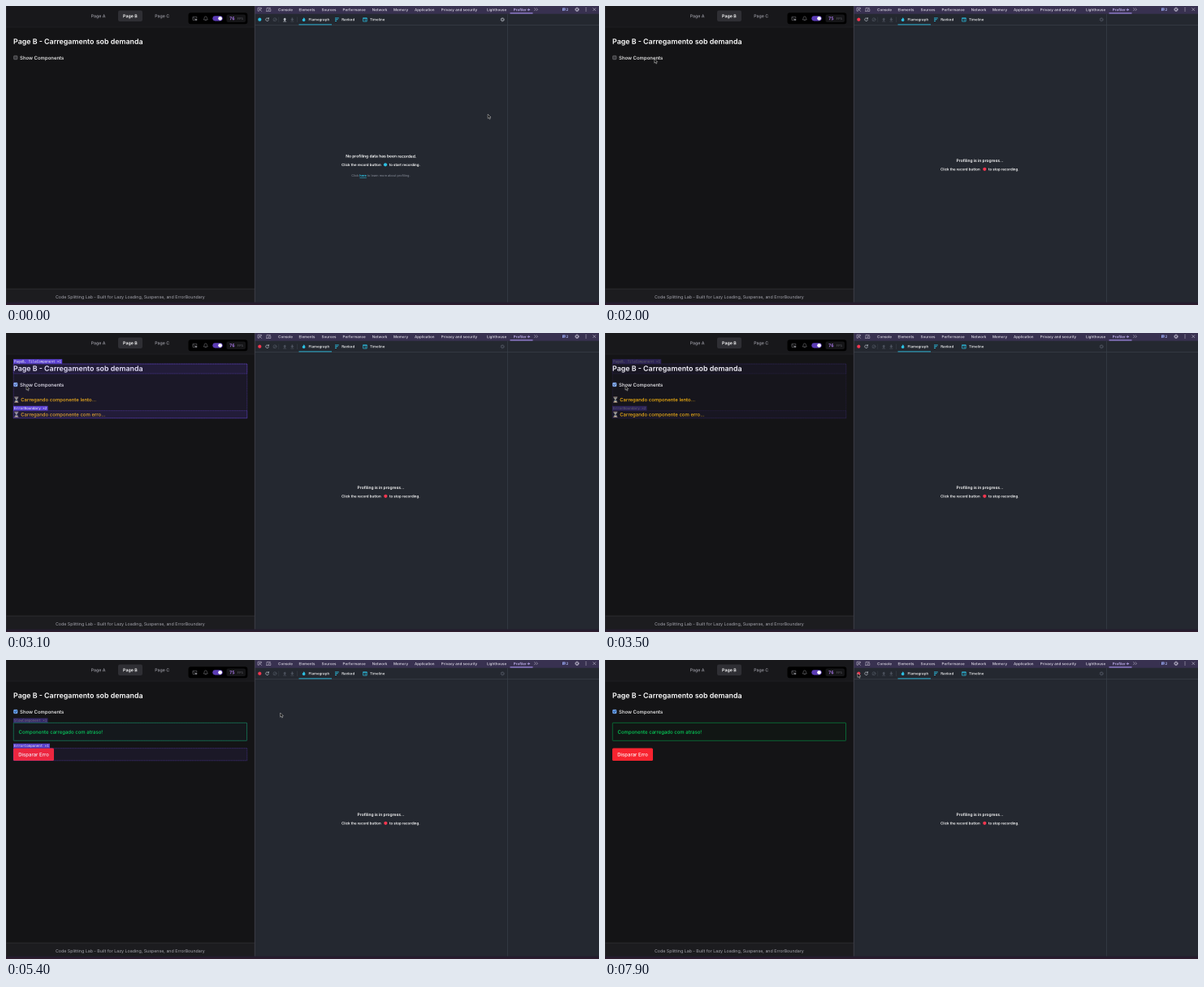
Recreate the animation shown at these times as an HTML page. Size 730 by 368 pixels, loop 8000 ms.

```html
<!DOCTYPE html>
<html lang="pt">
<head>
<meta charset="utf-8">
<title>Page B</title>
<style>
html, body { margin: 0; width: 100%; height: 100%; overflow: hidden; background: #141416; }
svg { display: block; width: 730px; height: 368px; }
/* the tiny tilt lets small glyphs sit between whole pixels */
text { font-family: Inter, "Open Sans", sans-serif; text-rendering: geometricPrecision; white-space: pre;
  transform-box: fill-box; transform-origin: 0 50%; transform: rotate(.03deg); }
.nav { font-size: 5.25px; font-weight: 500; fill: #a1a1aa; text-anchor: middle; }
.body { font-size: 6px; font-weight: 500; }
.tab { font-size: 4.55px; font-weight: 500; fill: #dedbe6; text-anchor: middle; }
.sub { font-size: 4.5px; font-weight: 500; fill: #f2f3f5; }
.big { font-size: 4.95px; font-weight: 600; fill: #fff; text-anchor: middle; }
.mid { font-size: 4.42px; font-weight: 600; fill: #fff; }
.small { font-size: 3.85px; fill: #8b919d; text-anchor: middle; }
.mono { font-family: "DejaVu Sans Mono", monospace; }
.label { font-size: 4.2px; fill: #fff; }
.line { fill: none; stroke-width: .7; stroke-linecap: round; stroke-linejoin: round; }
</style>
</head>
<body>
<svg viewBox="0 0 730 368">
  <defs>
    <path id="arrow" d="M-.8 0H.8V1.8H2.1L0 3.9-2.1 1.8H-.8Z"/>
    <g id="gear"><circle r="1.5" fill="none" stroke-width=".7"/><circle r="2.2" fill="none" stroke-width=".7" stroke-dasharray=".87 .86"/></g>
    <g id="glass">
      <path d="M.8 0H5.2V1.2Q5 2.4 3.4 3.3Q5 4.2 5.2 5.4V6.6H.8V5.4Q1 4.2 2.6 3.3Q1 2.4 .8 1.2Z" fill="#6f7a80"/>
      <path d="M.4 .1H5.6M.4 6.5H5.6" stroke="#a98a74" stroke-width=".7"/>
      <path d="M1.5 6.1Q3 3.8 4.5 6.1ZM1.9 1.6H4.1L3 2.9Z" fill="#e8cf92"/>
    </g>
  </defs>

  <!-- page -->
  <rect width="306" height="368" fill="#141416"/>
  <rect width="306" height="26" fill="#18181b"/>
  <path d="M0 26.2H306" stroke="#232327" stroke-width=".6"/>
  <rect x="138" y="5.5" width="30" height="13.5" rx="2" fill="#2f2f34"/>
  <text class="nav" x="113.6" y="14.2">Page A</text>
  <text class="nav" x="152.9" y="14.2" style="fill:#fff;font-weight:600">Page B</text>
  <text class="nav" x="192.2" y="14.2">Page C</text>

  <rect x="224.5" y="8.3" width="72.8" height="14" rx="3" fill="#000"/>
  <g class="line" stroke="#85858b" style="stroke-width:.5">
    <path d="M230 15V13.3H234.8V14.9M230 15V17.4H231.8M231.2 14.5 232.7 16"/>
    <path d="M233 16.1H235V17.6H233Z" fill="#85858b"/>
    <path d="M243.5 16.6Q244.1 15.8 244.1 14.7Q244.2 12.9 245.8 12.9Q247.4 12.9 247.5 14.7Q247.5 15.8 248.1 16.6ZM245.2 17.7H246.4"/>
  </g>
  <rect x="254.3" y="12.3" width="12.4" height="6.1" rx="3.05" fill="#5b3bb5"/>
  <circle cx="263.6" cy="15.35" r="2.35" fill="#fff"/>
  <rect x="271.5" y="10.6" width="23.5" height="9.4" rx="2" fill="#151517"/>
  <text id="fps" class="mono" x="275" y="17.3" font-size="5.5" font-weight="700" fill="#a374e0"></text>
  <text class="mono" x="284.4" y="16.9" font-size="4.2" fill="#55555c">FPS</text>

  <text x="9" y="46.8" font-size="8.85" font-weight="600" fill="#fff">Page B - Carregamento sob demanda</text>
  <g id="box">
    <rect x="9.6" y="61.3" width="4.4" height="4.4" rx=".7" stroke-width=".6"/>
    <path id="tick" class="line" d="M10.6 63.6 11.5 64.6 13 62.4" stroke="#fff"/>
  </g>
  <text class="body" x="17" y="66" fill="#fafafa">Show Components</text>

  <g id="slowWait" fill="#ffb90a"><use href="#glass" x="9.8" y="78.8"/><text class="body" x="18.2" y="84.2">Carregando componente lento...</text></g>
  <g id="failWait" fill="#ffb90a"><use href="#glass" x="9.8" y="97"/><text class="body" x="18.2" y="102.4">Carregando componente com erro...</text></g>
  <g id="slow">
    <rect x="9.3" y="77.3" width="287.2" height="22" rx=".5" fill="#111614" stroke="#08783c" stroke-width=".8"/>
    <text class="body" x="15.6" y="90.8" fill="#05d65c">Componente carregado com atraso!</text>
  </g>
  <g id="fail">
    <rect x="9" y="108.4" width="50" height="15.6" rx="1.5" fill="#f8232f"/>
    <text class="body" x="34" y="118.5" fill="#fff" text-anchor="middle">Disparar Erro</text>
  </g>
  <g id="marks"></g>

  <rect y="348" width="306" height="17" fill="#1c1c1f"/>
  <path d="M0 348.2H306" stroke="#323237" stroke-width=".7"/>
  <text x="152.9" y="360" font-size="5.3" fill="#a6a6ae" text-anchor="middle">Code Splitting Lab - Built for Lazy Loading, Suspense, and ErrorBoundary</text>
  <path d="M.3 0V365" stroke="#3a3a3e" stroke-width=".6"/>

  <!-- developer tools -->
  <rect x="306" width="424" height="368" fill="#242830"/>
  <rect x="306" width="424" height="9.7" fill="#383150"/>
  <path d="M306 23.5H730M617.5 10V365" stroke="#3a3f49" stroke-width=".7"/>
  <path d="M306.3 0V365" stroke="#45454c" stroke-width=".8"/>
  <g class="line" stroke="#cbc6d8" style="stroke-width:.55">
    <path d="M311.4 6.2H310V2.2H314.4V3.6M312 3.9 314.6 6.5M312 5.6V3.9H313.7"/>
    <path d="M321 6V2.4H325.4M320.5 6.4H322.6M323.9 3.8H325.8V6.5H323.9Z"/>
    <path d="M650.6 2.7 652.1 4.2 650.6 5.7M653 2.7 654.5 4.2 653 5.7"/>
    <path d="M722.8 2.7 725.8 5.7M725.8 2.7 722.8 5.7"/>
    <use href="#gear" x="703" y="4.3"/>
  </g>
  <g fill="#dedbe6"><circle cx="714" cy="2.5" r=".5"/><circle cx="714" cy="4.3" r=".5"/><circle cx="714" cy="6.1" r=".5"/></g>
  <path d="M685 2.5H688.6V5.4H686.2L685 6.3Z" fill="#9aa9f5"/>
  <path d="M685.8 3.5H687.9M685.8 4.5H687.9" stroke="#383150" stroke-width=".4"/>
  <text class="tab" x="691" y="6" style="fill:#b3bdfa">2</text>
  <g id="tabs"></g>
  <g class="line" stroke="#c9b5ff" style="stroke-width:.4">
    <ellipse cx="643.3" cy="4.6" rx="1.4" ry=".5"/><ellipse cx="643.3" cy="4.6" rx=".5" ry="1.4"/>
  </g>
  <path d="M620.5 8.9H648.5" stroke="#b69cff" stroke-width="1"/>

  <circle id="rec" cx="312.3" cy="16.7" r="2.1"/>
  <path class="line" d="M323.2 15.6A1.9 1.9 0 1 0 323.4 17.3M323.5 14.4V15.8H322.1" stroke="#b4b9c3"/>
  <g class="line" stroke="#4d535f"><circle cx="331" cy="16.7" r="2"/><path d="M329.6 18.1 332.4 15.3"/></g>
  <use id="load" href="#arrow" transform="translate(343.2 18.4) scale(1 -1)"/>
  <use href="#arrow" x="352.4" y="14.5"  fill="#4d535f"/>
  <path id="tray" d="M341.2 19.1H345.2" stroke-width=".6"/>
  <path d="M350.4 19.1H354.4" stroke="#4d535f" stroke-width=".6"/>
  <path d="M335.7 13.5V20M358.5 13.5V20" stroke="#3a3f49" stroke-width=".6"/>
  <path d="M366.6 13.9Q369.1 16.1 368.4 18Q367.9 19.1 366.5 19.1Q364.9 19 364.7 17.6Q364.7 16.3 365.6 15.7Q366.6 15 366.6 13.9Z" fill="#2cc0e2"/>
  <path d="M405 14.9H409.8M405 16.7H408.5M405 18.5H407" stroke="#2cc0e2" stroke-width=".9"/>
  <path d="M440 14.6H444.2V19H440ZM440 15.5H444.2" class="line" stroke="#2cc0e2"/>
  <path d="M441.2 17H443M441.9 18H443.5" stroke="#2cc0e2" stroke-width=".5"/>
  <text class="sub" x="372.6" y="18.3">Flamegraph</text>
  <text class="sub" x="413.2" y="18.3">Ranked</text>
  <text class="sub" x="448" y="18.3">Timeline</text>
  <path d="M360.5 22.9H401" stroke="#2cc0e2" stroke-width=".9"/>
  <use id="gearB" href="#gear" x="611.2" y="16.7"/>

  <g id="idle">
    <text class="big" x="461.8" y="186.6">No profiling data has been recorded.</text>
    <text class="mid" x="413" y="197">Click the record button</text>
    <circle cx="467" cy="195.3" r="2.1" fill="#2cc0e2"/>
    <text class="mid" x="471.7" y="197">to start recording.</text>
    <text class="small" x="461.4" y="210">Click <tspan fill="#2cc0e2" font-weight="700" text-decoration="underline">here</tspan> to learn more about profiling.</text>
  </g>
  <g id="busy">
    <text class="big" x="461.6" y="192">Profiling is in progress...</text>
    <text class="mid" x="413" y="202.5">Click the record button</text>
    <circle cx="467.3" cy="200.8" r="2.1" fill="#f5364f"/>
    <text class="mid" x="472" y="202.5">to stop recording.</text>
  </g>
  <rect y="364.6" width="730" height="3.4" fill="#241c2e"/>
  <path d="M0 367.4H730" stroke="#3a1f2f" stroke-width=".8"/>
  <path id="cursor" d="M0 0V5.2L1.2 4.1 2.1 6.1 3 5.7 2.2 3.8H3.8Z" fill="#0c0c0c" stroke="#d4d4d4" stroke-width=".5" stroke-linejoin="round"/>
</svg>
<script>
const $ = id => document.getElementById(id);
const show = (id, on) => $(id).setAttribute("display", on ? "inline" : "none");
const paint = (id, attr, color) => $(id).setAttribute(attr, color);

const tabs = [["Console", 344], ["Elements", 370.5], ["Sources", 397.5], ["Performance", 428.7], ["Network", 460],
  ["Memory", 486], ["Application", 515.3], ["Privacy and security", 558], ["Lighthouse", 604], ["Profiler", 632.7]];
$("tabs").innerHTML = tabs.map(([name, x]) =>
  `<text class="tab" x="${x}" y="6.2"${name === "Profiler" ? ' style="fill:#d0bfff"' : ""}>${name}</text>`).join("");

// render highlights: start, end, top, height, label
const marks = [
  [2900, 3700, 38, 66.8, ""],
  [2900, 3700, 38, 12, "PageB, TileComponent ×1"],
  [2900, 3700, 95.6, 9.2, "ErrorBoundary ×2"],
  [5100, 5550, 77.4, 21.8, "SlowComponent ×1"],
  [5200, 5900, 108.6, 15.2, "ErrorComponent ×1"]
];

// cursor stops: time, x, y
const stops = [[0, 593.2, 133.2], [200, 372.5, 71], [300, 372.5, 71], [1100, 311, 16], [1300, 311, 16],
  [2000, 60.8, 65], [2100, 36, 66.5], [2600, 25, 65], [3700, 25, 65], [4500, 337.6, 65],
  [6200, 337.6, 65], [6900, 319, 19.5], [7400, 319, 19.5], [7600, 311.6, 16.8], [7700, 311.6, 16.8], [7900, 311, 16.2]];

function cursorAt(t) {
  const i = stops.findIndex(s => s[0] > t);
  if (i < 0) return stops[stops.length - 1].slice(1);
  const [a, x, y] = stops[i - 1], [b, u, v] = stops[i];
  const p = (t - a) / (b - a), e = p * p * (3 - 2 * p);
  return [x + (u - x) * e, y + (v - y) * e];
}

function mark([start, end, y, h, name], t) {
  if (t < start || t >= end) return "";
  const alpha = Math.min(1, 1.25 * (1 - (t - start) / (end - start)));
  const frame = `<rect x="9.2" y="${y}" width="287.6" height="${h}" fill="#7350f0" fill-opacity=".09" stroke="#7350f0" stroke-opacity=".55" stroke-width=".7" stroke-dasharray="1.5 .6"/>`;
  const tag = name && `<rect x="9" y="${y - 5.8}" width="${name.length * 2.53 + 2}" height="5.6" fill="#6246e0"/>
    <text class="mono label" x="10" y="${y - 1.6}">${name}</text>`;
  return `<g opacity="${alpha}">${frame}${tag}</g>`;
}

function draw(now) {
  const t = Math.floor(now % 8000 / 100) * 100;
  const recording = t >= 1300, checked = t >= 2900, slow = t >= 5100, fail = t >= 5200;
  const [x, y] = cursorAt(t);
  $("cursor").setAttribute("transform", `translate(${x} ${y})`);
  $("fps").textContent = t >= 1700 && t < 2400 || t >= 5100 && t < 6500 ? 75 : 76;

  show("idle", !recording);
  show("busy", recording);
  paint("rec", "fill", recording ? "#f5364f" : "#2cc0e2");
  const tool = recording ? "#4d535f" : "#c5c9d1";
  paint("load", "fill", tool);
  paint("tray", "stroke", tool);
  paint("gearB", "stroke", recording ? "#5b616d" : "#c5c9d1");

  const hover = t >= 2000 && t < 3900;
  paint("box", "fill", checked ? (hover ? "#8dbbff" : "#5c9df5") : "#3b3b3f");
  paint("box", "stroke", checked ? "#8dbbff" : "#7d7d82");
  paint("tick", "stroke", checked ? "#16283f" : "none");
  show("slowWait", checked && !slow);
  show("failWait", checked && !fail);
  $("failWait").setAttribute("transform", `translate(0 ${slow ? 12.6 : 0})`);
  show("slow", slow);
  show("fail", fail);
  $("marks").innerHTML = marks.map(m => mark(m, t)).join("");
  requestAnimationFrame(loop);
}

const begin = performance.now();
const loop = () => draw(performance.now() - begin);
loop();
</script>
</body>
</html>
```
